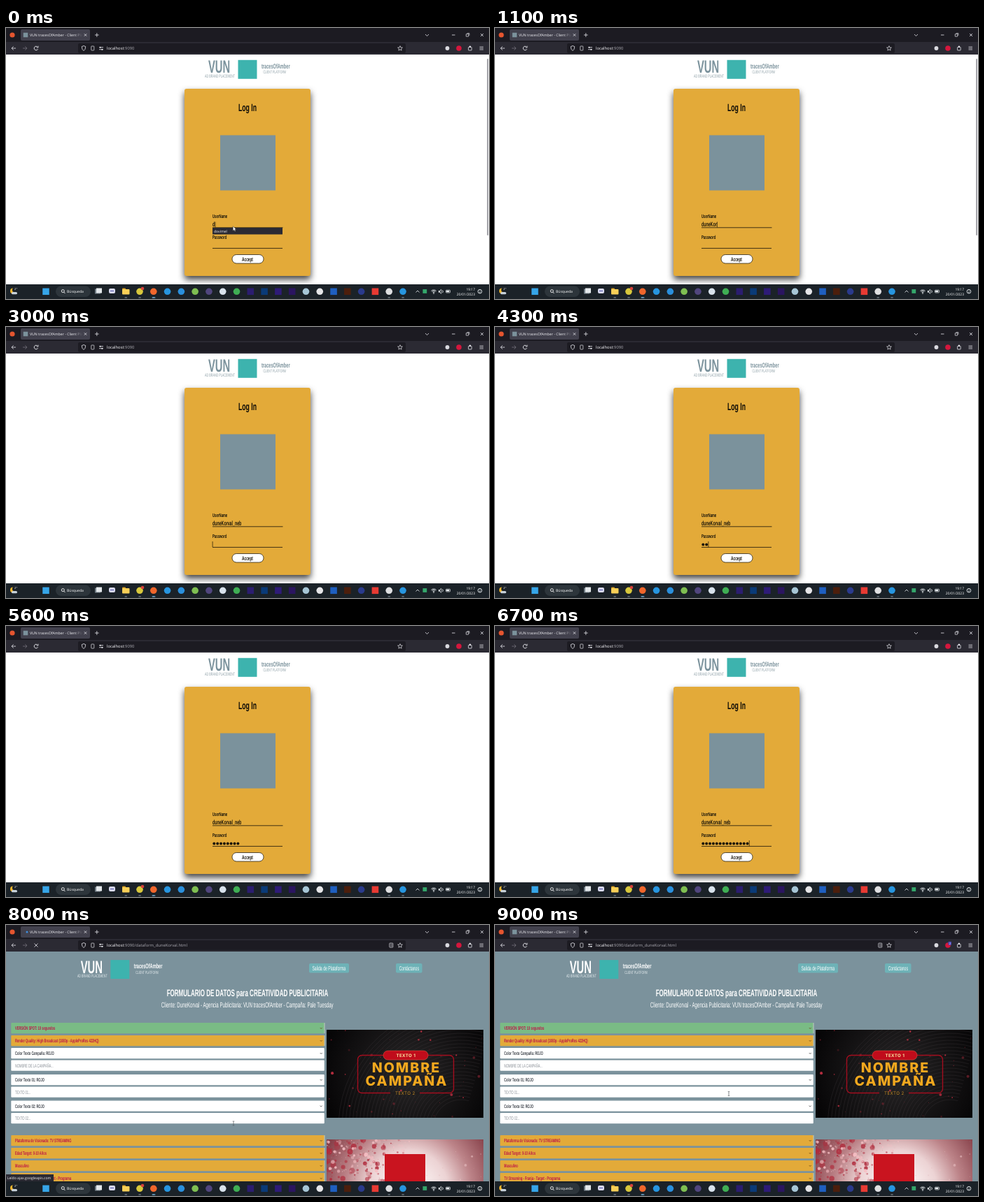
Animation of 690x388 px, one loop 9.3 s. Source, as an HTML page with a canvas:

```html
<!DOCTYPE html>
<html lang="es">
<head>
<meta charset="utf-8">
<title>Login demo</title>
<style>
html, body { margin: 0; width: 100%; height: 100%; overflow: hidden; background: #fff; }
canvas { display: block; width: 690px; height: 388px; }
</style>
</head>
<body>
<canvas id="stage" width="690" height="388"></canvas>
<script>
const ctx = document.getElementById('stage').getContext('2d');
const LOOP = 9300;
const SANS = '"Liberation Sans", Arial, sans-serif';
const SYSTEM = '"Open Sans", "Noto Sans", sans-serif';
const CONDENSED = 0.58;
const SLATE = '#7b929c', AMBER = '#e3aa39', TEAL = '#3db3ae';

const USER = 'duneKorval_neb';
const USER_KEYS = [0, 100, 300, 500, 800, 1000, 1100, 1300, 1500, 1600, 2000, 2300, 2500, 2700];
const PASS_KEYS = [4200, 4300, 4500, 4600, 4700, 4900, 5100, 5400, 5700, 5800, 6000, 6100, 6200, 6700, 7000, 7300];
const TAB_AT = 2900, SUBMIT_AT = 7800, FORM_AT = 8000, LOADED_AT = 8500;

// Keeps glyph advances exact at small sizes.
ctx.textRendering = 'geometricPrecision';

const count = (times, t) => times.filter(k => k <= t).length;

function rect(x, y, w, h, fill, r = 0) {
  ctx.fillStyle = fill;
  ctx.beginPath();
  ctx.roundRect(x, y, w, h, r);
  ctx.fill();
}

function disc(x, y, r, fill) {
  ctx.fillStyle = fill;
  ctx.beginPath();
  ctx.arc(x, y, r, 0, 7);
  ctx.fill();
}

function square(x, y, size, fill) {
  rect(x - size / 2, y - size / 2, size, size, fill);
}

function line(points, color, width = 0.8) {
  ctx.strokeStyle = color;
  ctx.lineWidth = width;
  ctx.beginPath();
  for (let i = 0; i < points.length; i += 2) ctx.lineTo(points[i], points[i + 1]);
  ctx.stroke();
}

function box(x, y, w, h, color, width = 0.8, r = 0) {
  ctx.strokeStyle = color;
  ctx.lineWidth = width;
  ctx.beginPath();
  ctx.roundRect(x, y, w, h, r);
  ctx.stroke();
}

function ring(x, y, r, color, from = 0, to = 7) {
  ctx.strokeStyle = color;
  ctx.lineWidth = 0.9;
  ctx.beginPath();
  ctx.arc(x, y, r, from, to);
  ctx.stroke();
}

function cross(x, y, r, color) {
  line([x - r, y - r, x + r, y + r], color);
  line([x - r, y + r, x + r, y - r], color);
}

function text(str, x, y, size, color, { weight = 400, align = 'left', family = SYSTEM, gap = 0 } = {}) {
  ctx.font = `${weight} ${size}px ${family}`;
  ctx.letterSpacing = gap + 'px';
  ctx.textAlign = align;
  ctx.fillStyle = color;
  ctx.fillText(str, x, y);
  const width = ctx.measureText(str).width;
  ctx.letterSpacing = '0px';
  return width;
}

// Condensed face: one fixed horizontal ratio for all page text.
function narrow(str, x, y, size, color, weight = 400, align = 'left') {
  ctx.save();
  ctx.translate(x, y);
  ctx.scale(CONDENSED, 1);
  const width = text(str, 0, 0, size, color, { weight, align, family: SANS });
  ctx.restore();
  return width * CONDENSED;
}

function rng(seed) {
  return () => (seed = (seed * 16807) % 2147483647) / 2147483647;
}

function browserBar(t) {
  const loading = t >= SUBMIT_AT && t < LOADED_AT;
  const form = t >= FORM_AT;
  const ink = '#e8e8ee';
  rect(0, 0, 690, 20, '#1c1b22');
  rect(0, 20, 690, 18, '#2b2a33');
  rect(21, 2, 99, 16, '#42414d', 2);
  disc(9, 10, 3.6, '#e5552f');
  if (loading) disc(30, 10, 1.5, '#3d8fe0');
  else square(28, 10, 6.5, SLATE);

  ctx.save();
  ctx.beginPath();
  ctx.rect(34, 2, 75, 16);
  ctx.clip();
  const fade = ctx.createLinearGradient(98, 0, 109, 0);
  fade.addColorStop(0, '#f4f4f8');
  fade.addColorStop(1, '#f4f4f800');
  text('VUN tracesOfAmber - Client Platform', 34, 12, 5.2, fade);
  ctx.restore();
  cross(113.5, 10, 1.7, ink);
  line([127, 10, 132.6, 10], ink);
  line([129.8, 7.2, 129.8, 12.8], ink);
  line([599, 9, 601.5, 11.5, 604, 9], ink);
  line([637, 10, 641.5, 10], ink);
  box(657.3, 8.7, 3.4, 3.4, ink, 0.7);
  line([658.6, 7.6, 661.9, 7.6, 661.9, 10.8], ink, 0.7);
  cross(680, 10, 2, ink);

  line([14, 29, 8, 29], ink);
  line([10.7, 26.4, 8, 29, 10.7, 31.6], ink);
  line([24, 29, 30, 29], '#74737c');
  line([27.3, 26.4, 30, 29, 27.3, 31.6], '#74737c');
  if (loading) cross(43, 29, 2.5, ink);
  else {
    ring(43, 29, 2.8, ink, 0.4, 5.6);
    line([46, 25.6, 46, 28, 43.7, 28], ink);
  }
  rect(103, 22, 468, 14, '#1c1b22', 2);
  ctx.strokeStyle = ink;
  ctx.lineWidth = 0.8;
  ctx.beginPath();
  ctx.moveTo(111, 25.5);
  ctx.lineTo(113.7, 26.6);
  ctx.quadraticCurveTo(113.8, 31, 111, 32.5);
  ctx.quadraticCurveTo(108.2, 31, 108.3, 26.6);
  ctx.closePath();
  ctx.stroke();
  box(121.8, 26, 4, 6, ink, 0.7, 0.6);
  line([133, 27.7, 139, 27.7], ink, 0.8);
  line([133, 30.7, 139, 30.7], ink, 0.8);
  disc(134.7, 27.7, 1, ink);
  disc(137.3, 30.7, 1, ink);

  const host = text('localhost', 144, 31.3, 5.85, '#fbfbfe');
  const path = t >= SUBMIT_AT ? '/dataform_duneKorval.html' : '';
  text(':9090' + path, 144 + host, 31.3, 5.85, '#a9a8b0');
  if (form) {
    box(547.8, 26, 5, 6, ink, 0.7, 0.6);
    line([549, 28, 552, 28], ink, 0.6);
    line([549, 30, 552, 30], ink, 0.6);
  }
  const star = [];
  for (let i = 0; i <= 10; i++) {
    const r = i % 2 ? 1.6 : 3.6, a = i * Math.PI / 5 - Math.PI / 2;
    star.push(563 + r * Math.cos(a), 29.2 + r * Math.sin(a));
  }
  line(star, ink, 0.7);
  disc(630.5, 29, 2.9, '#dadae0');
  disc(647, 29, 3.8, '#d5173d');
  if (t >= 8800) {
    rect(647.5, 23.8, 4.5, 5, '#4a4ab8', 1);
    text('2', 649.8, 28, 4, '#fff', { align: 'center' });
  }
  box(660.6, 27.4, 4.6, 4.6, ink, 0.8, 0.5);
  disc(662.9, 26.8, 1.2, ink);
  for (const y of [27, 29, 31]) line([676.5, y, 682, y], ink, 0.7);
}

function taskbar() {
  rect(0, 367, 690, 21, '#1b2228');
  disc(10, 376.5, 4, '#f1b52d');
  disc(12.3, 375, 3.3, '#1b2228');
  text('2°', 12, 375, 4.2, '#fff');
  rect(8, 378, 8, 3.3, '#c8d2da', 1.6);
  square(57, 377.3, 9.5, '#36a5e8');
  rect(71, 369.5, 50, 15.5, '#2d353b', 7.7);
  ring(81.3, 376.6, 2, '#fff');
  line([82.8, 378.2, 84.4, 380], '#fff', 0.9);
  text('Búsqueda', 87, 379.2, 5.1, '#fff');
  rect(127, 373.5, 8, 7, '#737f88');
  rect(129, 372.5, 8, 7, '#e4e8eb');
  rect(147, 373, 9, 7, '#d8d9ef', 2);
  line([149, 376.5, 154, 376.5], '#6264b0', 1.2);
  rect(166, 372.5, 5, 3, '#d39a22', 1);
  rect(166, 374, 10.5, 7.5, '#f8cf57', 1);

  const apps = 'd8c83c f0662c 2795df 2a8fdc 7fbf52 51467e d8e2ec 3fae54 s2b1d70 s0a3a78 s2e1b78 s2b1560 a7c6d6 e6e6e8 s1f5fc0 s4c1e0c 2a3a8c se83a33 e0e0e2 2795df'.split(' ');
  apps.forEach((app, i) => {
    const x = 191 + i * 19.79;
    if (app[0] === 's') square(x, 377.3, 9.6, '#' + app.slice(1));
    else disc(x, 377.3, 4.8, '#' + app);
  });
  disc(195, 373, 2.3, '#d8423b');
  for (const i of [-1, 0, 1, 18, 19]) rect(189.3 + i * 19.79, 385.5, 3.5, 1, '#8e9aa4', 0.5);
  rect(208.5, 385.5, 5, 1, '#68b8ee', 0.5);

  const ink = '#eef2f5';
  line([585.5, 378.5, 588, 376, 590.5, 378.5], ink);
  square(598.3, 377, 5.8, '#35a86b');
  for (const r of [1.6, 3.4, 5]) ring(611, 380, r, ink, -2.35, -0.79);
  disc(611, 380, 0.8, ink);
  rect(618, 376, 1.8, 2.7, ink);
  line([619.8, 376, 621.6, 374.3, 621.6, 380.3, 619.8, 378.6], ink, 0.7);
  ring(621.7, 377.3, 2.5, ink, -0.9, 0.9);
  box(628.5, 375.2, 6, 3.8, ink, 0.7, 0.8);
  rect(629.2, 376, 4, 2.2, ink);
  text('19:17', 670, 375.5, 4.95, '#fff', { align: 'right' });
  text('20/01/2023', 670, 382.5, 4.95, '#fff', { align: 'right' });
  ring(677, 377.2, 2.8, ink);
  text('2', 677, 378.9, 4.5, ink, { align: 'center' });
}

function brand(x, y, color, soft) {
  narrow('VUN', x, y, 25.5, color, 700, 'center');
  narrow('AD BRAND PLACEMENT', x + 1, y + 6.2, 6.4, soft, 400, 'center');
  square(x + 40.5, y - 5, 27, TEAL);
  narrow('tracesOfAmber', x + 60.5, y - 6.2, 9.7, color, 700);
  narrow('CLIENT PLATFORM', x + 63, y + 1, 6.1, soft);
}

function loginPage(t) {
  rect(0, 38, 690, 329, '#fff');
  brand(304.5, 64.3, SLATE, '#8fa0a8');
  if (t < 1700) {
    ctx.globalAlpha = Math.min(1, (1700 - t) / 600);
    rect(687.3, 44, 1.6, 253, '#8f8f96', 0.8);
    ctx.globalAlpha = 1;
  }
  ctx.save();
  ctx.shadowColor = 'rgba(0,0,0,.75)';
  ctx.shadowBlur = 10;
  ctx.shadowOffsetY = 5;
  rect(255, 87, 180, 268, AMBER, 3);
  ctx.restore();

  narrow('Log In', 345, 118.8, 14.9, '#0c0a06', 700, 'center');
  square(345.5, 193, 79, SLATE);

  const dark = '#17130a';
  narrow('UserName', 295, 271.8, 7.4, dark, 700);
  narrow('Password', 295, 301.6, 7.4, dark, 700);
  line([295, 285.8, 395.5, 285.8], dark, 0.8);
  line([295, 315.4, 395, 315.4], dark, 0.8);

  const typed = USER.slice(0, count(USER_KEYS, t));
  const end = 295 + narrow(typed, 295, 284.3, 9.1, dark, 700);
  if (t < TAB_AT) line([end + 0.7, 277.5, end + 0.7, 285.3], dark, 0.7);
  if (t < 100) {
    rect(295, 286, 100, 9.6, '#2b2a33', 0.5);
    text('dovimel', 297, 292.8, 5.1, '#f2f2f6');
  }

  const dots = count(PASS_KEYS, t), pitch = 4.87;
  for (let i = 0; i < dots; i++) disc(297.3 + i * pitch, 311.5, 1.95, dark);
  const blinkOff = (t >= 3500 && t < 4000) || (t >= 5600 && t < 5700);
  if (t >= TAB_AT && t < SUBMIT_AT && !blinkOff) {
    const x = 295.1 + dots * pitch;
    line([x, 307, x, 315], dark, 0.7);
  }

  rect(323, 324.5, 45, 12.5, '#fff', 6.2);
  box(323, 324.5, 45, 12.5, '#2a2418', 0.8, 6.2);
  narrow('Accept', 345, 333.6, 8.2, dark, 700, 'center');
  if (t >= SUBMIT_AT) status('Leído localhost', 40.5);
  if (t < 100) arrow(324.3, 283.8);
}

function status(label, width) {
  rect(0, 357, width, 10, '#2b2a33');
  text(label, 1.8, 364, 5.1, '#f4f4f8');
}

function arrow(x, y) {
  ctx.beginPath();
  ctx.moveTo(x, y);
  ctx.lineTo(x, y + 6.6);
  ctx.lineTo(x + 1.5, y + 5.2);
  ctx.lineTo(x + 2.7, y + 7.4);
  ctx.lineTo(x + 3.6, y + 6.9);
  ctx.lineTo(x + 2.6, y + 4.8);
  ctx.lineTo(x + 4.5, y + 4.6);
  ctx.closePath();
  ctx.fillStyle = '#fff';
  ctx.fill();
  ctx.strokeStyle = '#222';
  ctx.lineWidth = 0.4;
  ctx.stroke();
}

function beam(x, y) {
  const ink = '#555a5e';
  line([x, y - 3, x, y + 3], ink, 0.7);
  line([x - 1.3, y - 3, x + 1.3, y - 3], ink, 0.6);
  line([x - 1.3, y + 3, x + 1.3, y + 3], ink, 0.6);
}

function row(y, label, kind) {
  const colored = kind === 'amber' || kind === 'green';
  const input = kind === 'input';
  const fill = { amber: AMBER, green: '#7abb85' }[kind] || '#fff';
  const ink = colored ? '#bd1648' : input ? '#8b9198' : '#3b4048';
  rect(7.3, y, 447.5, 15.2, fill, 1);
  if (colored) line([455, y, 455, y + 15.2], '#dfe3d2', 0.7);
  narrow(label, 13, y + 10.2, 7, ink, input ? 400 : 700);
  if (!input) line([448.7, y + 7, 450.2, y + 8.5, 451.7, y + 7], colored ? '#6b4a18' : '#444', 0.8);
}

function specks(seed, n, x, y, w, h, hue, size) {
  const rand = rng(seed);
  for (let i = 0; i < n; i++) {
    ctx.globalAlpha = 0.2 + rand() * 0.7;
    disc(x + rand() * w, y + rand() * h, 0.3 + rand() ** 3 * size, hue);
  }
  ctx.globalAlpha = 1;
}

function clipped(x, y, w, h, draw) {
  ctx.save();
  ctx.beginPath();
  ctx.rect(x, y, w, h);
  ctx.clip();
  draw();
  ctx.restore();
}

function darkSpot() {
  const glow = ctx.createRadialGradient(575, 212, 10, 575, 212, 125);
  glow.addColorStop(0, '#262425');
  glow.addColorStop(1, '#060506');
  rect(458, 150, 224, 126, glow);
  ctx.globalAlpha = 0.3;
  for (let r = 40; r < 180; r += 5) ring(650, 290, r, '#4a4546', 3, 5);
  specks(77, 75, 458, 150, 224, 126, '#c93245', 1.8);
  box(502.5, 186.5, 137, 54, '#a30d1e', 1.4, 6);
  rect(549, 239, 42, 3.5, '#1e1c1d');
  rect(539, 180, 64, 13, '#c00c1b', 6.5);
  box(539, 180, 64, 13, '#e5533f', 0.6, 6.5);
  const wide = { weight: 800, align: 'center', family: 'Inter, "Liberation Sans", sans-serif' };
  text('TEXTO 1', 571.3, 188.9, 6.2, '#fbe6a0', { ...wide, weight: 700, gap: 0.4 });
  text('NOMBRE', 572, 211, 19.6, '#f3a81e', { ...wide, gap: 2 });
  text('CAMPAÑA', 572.5, 229.6, 19.6, '#f3a81e', { ...wide, gap: 2 });
  text('TEXTO 2', 570.3, 243, 6.2, '#c98f26', { ...wide, weight: 400, gap: 0.4 });
}

function pinkSpot() {
  const glow = ctx.createRadialGradient(575, 380, 10, 575, 380, 145);
  glow.addColorStop(0, '#fffafa');
  glow.addColorStop(0.35, '#ecd3d4');
  glow.addColorStop(0.6, '#bc8388');
  glow.addColorStop(1, '#742a34');
  rect(458, 307, 224, 60, glow);
  specks(93, 160, 458, 307, 112, 60, '#b02a3b', 4);
  specks(31, 170, 458, 307, 130, 50, '#f6bfc4', 2.6);
  specks(57, 30, 570, 307, 112, 60, '#e6bcc0', 1.6);
  square(570, 357, 58, '#c9141f');
}

function formPage(t) {
  rect(0, 38, 690, 329, SLATE);
  brand(122.3, 68.6, '#fff', '#e3eaed');
  rect(433, 55, 57, 13.6, '#6eb2b7', 2);
  rect(557, 55, 37.5, 13.6, '#6eb2b7', 2);
  narrow('Salida de Plataforma', 461.3, 64.6, 8.9, '#fff', 400, 'center');
  narrow('Contáctanos', 575.8, 64.6, 8.7, '#fff', 400, 'center');
  narrow('FORMULARIO DE DATOS para CREATIVIDAD PUBLICITARIA', 345, 102, 13.8, '#fff', 700, 'center');
  narrow('Cliente: DuneKorval - Agencia Publicitaria: VUN tracesOfAmber - Campaña: Pale Tuesday',
    344.7, 117.7, 10.6, '#fff', 400, 'center');

  row(140, 'VERSIÓN SPOT: 10 segundos', 'green');
  row(158, 'Render Quality: High Broadcast (1080p - AppleProRes 422HQ)', 'amber');
  row(176, 'Color Texto Campaña: ROJO', 'select');
  row(193.6, 'NOMBRE DE LA CAMPAÑA...', 'input');
  row(214, 'Color Texto 01: ROJO', 'select');
  row(231.6, 'TEXTO 01...', 'input');
  row(251.6, 'Color Texto 02: ROJO', 'select');
  row(269, 'TEXTO 02...', 'input');
  ['Plataforma de Visionado: TV STREAMING', 'Edad Target: 0-10 Años', 'Masculino',
    'TV Streaming - Franja - Target - Programa'].forEach((label, i) => row(301 + i * 18, label, 'amber'));

  clipped(458, 150, 224, 126, darkSpot);
  clipped(458, 307, 224, 60, pinkSpot);
  if (t < LOADED_AT) status('Leído ajax.googleapis.com', 68);

  const move = Math.min(1, Math.max(0, Math.floor((t - 8700) / 100) / 3));
  beam(325 + 9 * move, 284 - 42.5 * move);
}

function render(now) {
  const t = now % LOOP;
  ctx.clearRect(0, 0, 690, 388);
  (t < FORM_AT ? loginPage : formPage)(t);
  browserBar(t);
  taskbar();
}

let start;
function tick(now) {
  start ??= now;
  render(now - start);
  requestAnimationFrame(tick);
}
render(0);
requestAnimationFrame(tick);
</script>
</body>
</html>
```
